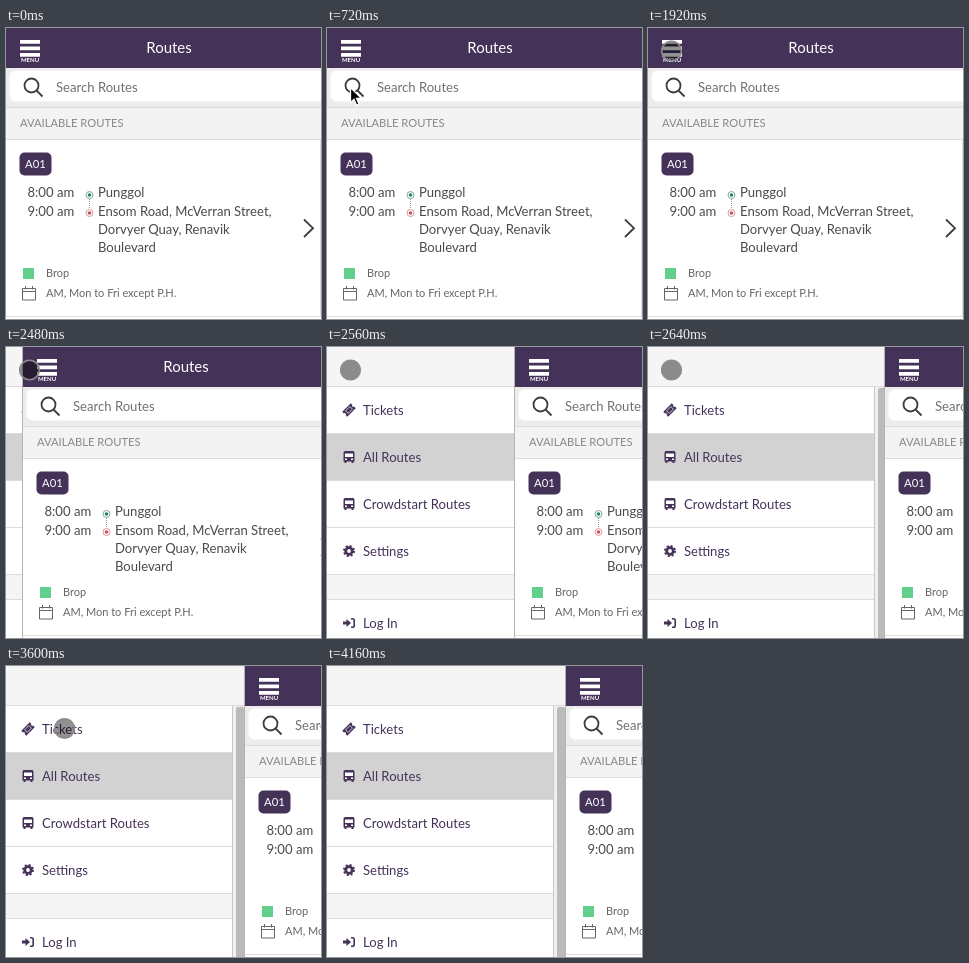
An HTML page that plays this animation: 315 by 291 pixels, repeating every 5.76 s.

```html
<!DOCTYPE html>
<html lang="en">
<head>
<meta charset="utf-8">
<title>Routes menu</title>
<style>
  html, body { margin: 0; width: 100%; height: 100%; overflow: hidden; background: #fff; }
  svg { display: block; width: 315px; height: 291px; font: 13.1px Lato, sans-serif; }
  .line { stroke: #dcdcdc; fill: none; }
  .plum { fill: #453259; }
  .ink { fill: #4a4a4a; }
  .white { fill: #fff; }
  .small { font-size: 11px; fill: #666; }
  .stroke { fill: none; stroke: #3c3c3c; stroke-width: 1.8; }
</style>
</head>
<body>
<svg viewBox="0 0 315 291">
  <defs>
    <g id="bus">
      <path d="M2 0H10Q11.5 0 11.5 2V10.5H10.5V12H8.5V10.5H3.5V12H1.5V10.5H.5V2Q.5 0 2 0Z"/>
      <path class="white" d="M2 2.5H10V6H2Z"/>
      <path class="white" d="M2 7.5H4V9H2ZM8 7.5H10V9H8Z"/>
    </g>
  </defs>

  <g id="menu">
    <rect width="315" height="291" fill="#f0f0f0"/>
    <rect width="315" height="40" fill="#f5f5f5"/>
    <rect y="40" width="226" height="251" class="white"/>
    <rect y="86" width="226" height="47" fill="#d2d2d2"/>
    <rect y="227" width="226" height="25" fill="#f5f5f5"/>
    <path class="line" d="M0 39.5H239M0 86.5H226M0 133.5H226M0 180.5H226M0 227.5H226M0 252.5H226"/>
    <path d="M226.5 40V291" stroke="#c8c8c8"/>
    <rect x="230" y="41" width="8" height="260" rx="2" fill="#bbb"/>
    <g class="plum">
      <g transform="translate(22 63) rotate(-45)">
        <path d="M-6-3.5H6V-1.2A1.2 1.2 0 0 0 6 1.2V3.5H-6V1.2A1.2 1.2 0 0 0-6-1.2Z"/>
        <path d="M-3-1.8H3V1.8H-3Z" fill="none" stroke="#fff" stroke-width=".7"/>
      </g>
      <use href="#bus" x="16" y="104"/>
      <use href="#bus" x="16" y="151"/>
      <g fill="none" stroke="#453259">
        <circle cx="22" cy="204" r="3.3" stroke-width="2.8"/>
        <circle cx="22" cy="204" r="5" stroke-width="2" stroke-dasharray="2 1.927"/>
        <path d="M24 271.7H25.5Q27.2 271.7 27.2 273.5V278.5Q27.2 280.3 25.5 280.3H24" stroke-width="1.6"/>
      </g>
      <path d="M16 274.5H19.5V272L24 276L19.5 280V277.5H16Z"/>
      <text x="36" y="68">Tickets</text>
      <text x="36" y="115">All Routes</text>
      <text x="36" y="162">Crowdstart Routes</text>
      <text x="36" y="209">Settings</text>
      <text x="36" y="281">Log In</text>
    </g>
  </g>

  <g id="panel">
    <rect x="-1" width="1" height="291" fill="#b4b4b4"/>
    <rect width="340" height="291" class="white"/>
    <rect width="340" height="40" class="plum"/>
    <path class="white" d="M14 12H34V15.8H14ZM14 18.4H34V22.2H14ZM14 24.9H34V28.7H14Z"/>
    <text x="24" y="34" class="white" font-size="6" font-weight="bold" text-anchor="middle">MENU</text>
    <text x="163" y="25" class="white" font-size="15" text-anchor="middle">Routes</text>

    <rect y="40" width="340" height="39" fill="#ececec"/>
    <rect x="3.5" y="42.5" width="350" height="31" rx="6" class="white"/>
    <circle class="stroke" cx="25.5" cy="57.5" r="7"/>
    <path class="stroke" d="M30.5 62.5L36.5 68.5"/>
    <text x="50" y="64" fill="#707070">Search Routes</text>

    <rect y="79" width="340" height="33" fill="#f3f3f3"/>
    <path class="line" d="M0 79.5H340M0 111.5H340M0 288.5H340M314.5 112V288"/>
    <text x="14" y="99" font-size="11.2" fill="#888">AVAILABLE ROUTES</text>

    <rect x="13.5" y="124.5" width="32" height="23" rx="5" class="plum"/>
    <text x="29.5" y="140" class="white" font-size="11.3" text-anchor="middle">A01</text>
    <g class="ink">
      <text x="21.5" y="169.4">8:00 am</text>
      <text x="21.5" y="188.4">9:00 am</text>
      <text x="92" y="169.4">Punggol</text>
      <text x="92" y="188.4">Ensom Road, McVerran Street,</text>
      <text x="92" y="206.4">Dorvyer Quay, Renavik</text>
      <text x="92" y="224.4">Boulevard</text>
    </g>
    <path d="M83.5 171V181" stroke="#999" stroke-dasharray="1 1"/>
    <g fill="none" stroke="#8aa79b">
      <circle cx="83.5" cy="167" r="3.5"/>
      <circle cx="83.5" cy="185" r="3.5" stroke="#d99"/>
    </g>
    <circle cx="83.5" cy="167" r="1.8" fill="#1d8a5a"/>
    <circle cx="83.5" cy="185" r="1.8" fill="#c4525a"/>
    <path class="stroke" d="M298 191.5L307 200.2L298 209"/>

    <rect x="17" y="240" width="11" height="11" fill="#62d08c"/>
    <text x="40" y="249" class="small">Brop</text>
    <path d="M16.5 260.5H29.5V272H16.5ZM16.5 263.5H29.5M19.5 258V261.5M26.5 258V261.5" fill="none" stroke="#666"/>
    <text x="40" y="269" class="small">AM, Mon to Fri except P.H.</text>
  </g>

  <path id="arrow" d="M.5.5V15.5L4 12.3L6.5 18L9 17L6.6 11.3H11.3Z" fill="#000" stroke="#fff" stroke-width="1.3"/>
  <circle id="touch" fill="#000" fill-opacity=".43" stroke="#8c8c8c" stroke-width="1.6"/>
</svg>
<script>
const LOOP = 5760, STEP = 80;
const [panel, arrow, touch] = ['panel', 'arrow', 'touch'].map(id => document.getElementById(id));

// [time, x, y]
const arrowPath = [
  [320, 173, 253], [400, 113, 176], [480, 113, 176], [560, 68, 119], [640, 37, 78],
  [720, 23, 59], [800, 18, 49], [880, 17, 42], [960, 20, 39],
  [1120, 20, 39], [1200, 20, 34], [1280, 21, 26], [1360, 22, 22]
];
const touchPath = [
  [1840, 23.5, 23], [3120, 23.5, 23], [3200, 29.5, 23], [3280, 37, 32], [3360, 46, 45],
  [3440, 53, 55], [3520, 57, 61], [3600, 58.5, 62.5],
  [3920, 58.5, 62.5], [4000, 58.5, 42], [4080, 58.5, 14]
];

function along(path, t) {
  const i = path.findIndex(p => p[0] > t);
  if (i < 0) return path.at(-1).slice(1);
  if (i === 0) return path[0].slice(1);
  const [t0, x0, y0] = path[i - 1], [t1, x1, y1] = path[i];
  const k = (t - t0) / (t1 - t0);
  return [x0 + (x1 - x0) * k, y0 + (y1 - y0) * k];
}

// CSS "ease": cubic-bezier(.25, .1, .25, 1)
function ease(x) {
  if (x <= 0 || x >= 1) return x <= 0 ? 0 : 1;
  const curve = (a, b, s) => 3 * a * s * (1 - s) ** 2 + 3 * b * s * s * (1 - s) + s ** 3;
  let lo = 0, hi = 1;
  for (let i = 0; i < 20; i++) {
    const mid = (lo + hi) / 2;
    if (curve(.25, .25, mid) < x) lo = mid; else hi = mid;
  }
  return curve(.1, 1, lo);
}

function place(el, path, t, from, to) {
  el.style.display = t >= from && t < to ? '' : 'none';
  el.setAttribute('transform', `translate(${along(path, t)})`);
}

function draw(now) {
  const t = Math.floor(now % LOOP / STEP) * STEP;
  panel.setAttribute('transform', `translate(${Math.round(239 * ease((t - 2463) / 200))})`);
  place(arrow, arrowPath, t, 320, 1840);
  place(touch, touchPath, t, 1840, 4160);
  const landing = t < 1920;
  touch.setAttribute('r', landing ? 17.5 : 9.8);
  touch.setAttribute('opacity', landing ? .5 : 1);
}

const start = performance.now();
function tick() {
  draw(performance.now() - start);
  requestAnimationFrame(tick);
}
tick();
</script>
</body>
</html>
```
